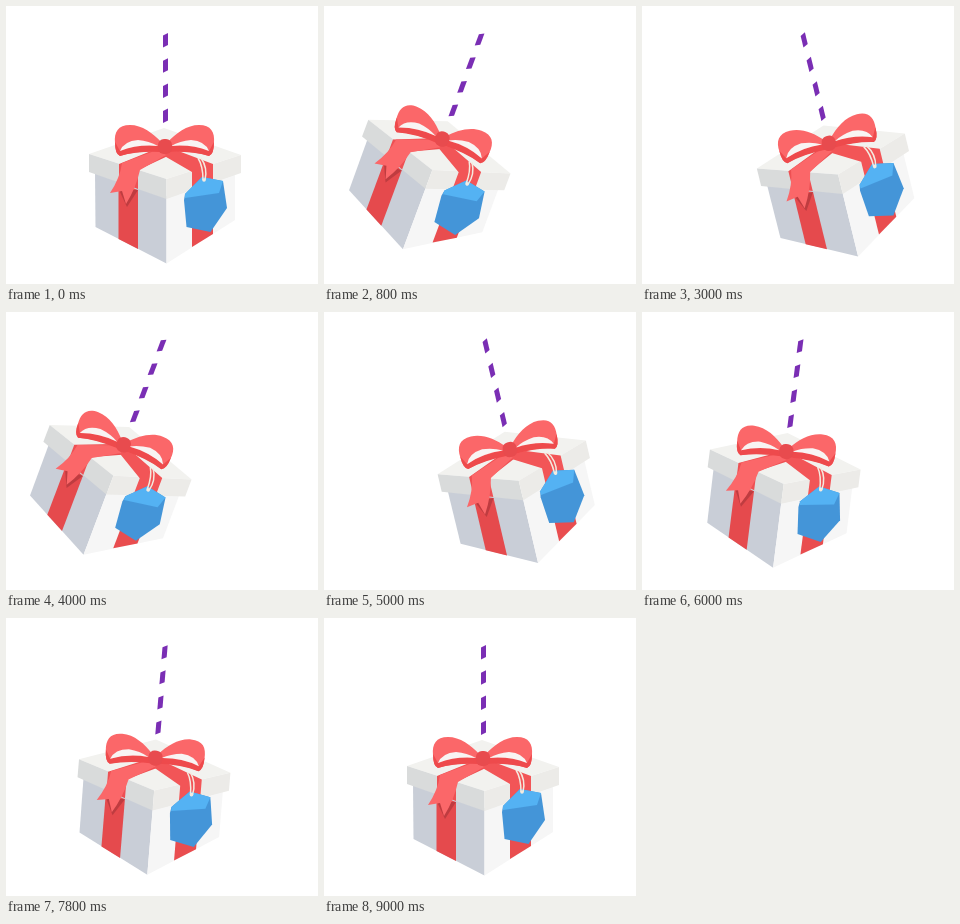
Write an HTML page that moves like this. It is 312x278 px and loops after 9200 ms.

```html
<!DOCTYPE html>
<html lang="en">
<head>
<meta charset="utf-8">
<title>Swinging gift</title>
<style>
  html, body { margin: 0; width: 100%; height: 100%; overflow: hidden; background: #fff; }
  svg { display: block; width: 100%; height: 100%; }
</style>
</head>
<body>
<svg viewBox="0 0 312 278">
  <g id="gift">
    <g id="rope" fill="#7a2eb4">
      <path id="dash" d="M157 29.5 162 27V39L157 41.5Z"/>
      <use href="#dash" y="25.2"/>
      <use href="#dash" y="50.4"/>
      <use href="#dash" y="75.6"/>
    </g>

    <!-- box body -->
    <path fill="#c9ced7" d="M89 165 160.5 190V257.5L89.5 221Z"/>
    <path fill="#f6f6f6" d="M160.500 190 229 167V214L160.500 257.500Z"/>
    <path fill="#e54a4d" d="M112.500 177 132 184V243L112.500 233Z"/>
    <path fill="#e94d4f" d="M186 183 207 176V228L186 241Z"/>

    <!-- lid -->
    <path fill="#f2f2ef" d="M83 148 158 122 235 149 160.500 173Z"/>
    <path fill="#d9dbdb" d="M83 148 160.500 173V193L83 166Z"/>
    <path fill="#ecebe8" d="M160.500 173 235 149V167L160.500 193Z"/>
    <path fill="#ee5053" d="M113 158 150 143 164 149 132 164V183L113 176Z"/>
    <path fill="#f25557" d="M155 148 167 143 207 158V176L186 183V166Z"/>
    <path fill="#bf3c40" d="M113 184H132L121 201Z"/>

    <!-- bow -->
    <path fill="#fb6769" d="M151 144 160 149 134 164Q130 182 120 198L116 185 104 187Q114 172 116 157Z"/>
    <g id="loop">
      <path fill="#fb6769" d="M156 137C147 127 136 119 124 119 112 119 108 126 109 137Q109 148 114 150Q132 144 154 146Z"/>
      <path fill="#ee4a4c" d="M109 136Q109 148 114 150Q132 145 154 146V140Q130 138 114 145Z"/>
      <path fill="#f8f4f3" d="M114 145Q118 135 132 134 143 135 152 140 132 138 114 145Z"/>
    </g>
    <use href="#loop" transform="matrix(-1 0 0 1 317 0)"/>
    <rect x="152" y="133" width="14" height="15" rx="6" fill="#e84b4e"/>

    <!-- tag -->
    <path fill="#4495d8" d="M179 188 196 171 217 175 221 202 204.500 226 180.500 221 178 194Z"/>
    <path fill="#54b2f3" d="M179 188 196 171 217 175 213 187 179 192Z"/>
    <path fill="none" stroke="#f4eadf" stroke-width="1.500" d="M192 152Q197 160 197 174M195 152Q202 162 199 174"/>
    <circle cx="198" cy="174" r="1.800" fill="#f4eadf"/>
  </g>
</svg>
<script>
  const gift = document.getElementById("gift");
  const LOOP = 9200, STEP = 200, SETTLE = 6800;

  // [time, degrees]: steady stepped swings up to SETTLE, held poses after it.
  const keys = [
    [0, 0], [400, 7], [1000, 27], [2600, -27.5], [4000, 20.7], [5200, -20],
    [6200, 14], [SETTLE, -4.7], [7300, 0], [7800, 4.7], [8000, 0], [8500, -4.7], [9000, 0]
  ];

  function angleAt(time) {
    const next = keys.findIndex(([start]) => start > time);
    if (next < 0) return keys.at(-1)[1];
    const [start, from] = keys[next - 1], [end, to] = keys[next];
    if (time >= SETTLE) return from;
    const stepped = Math.floor(time / STEP) * STEP;
    return from + (to - from) * (stepped - start) / (end - start);
  }

  const origin = performance.now();
  function draw() {
    const time = Math.max(0, performance.now() - origin) % LOOP;
    gift.setAttribute("transform", `rotate(${angleAt(time)} 159.5 23)`);
    requestAnimationFrame(draw);
  }
  draw();
</script>
</body>
</html>
```
